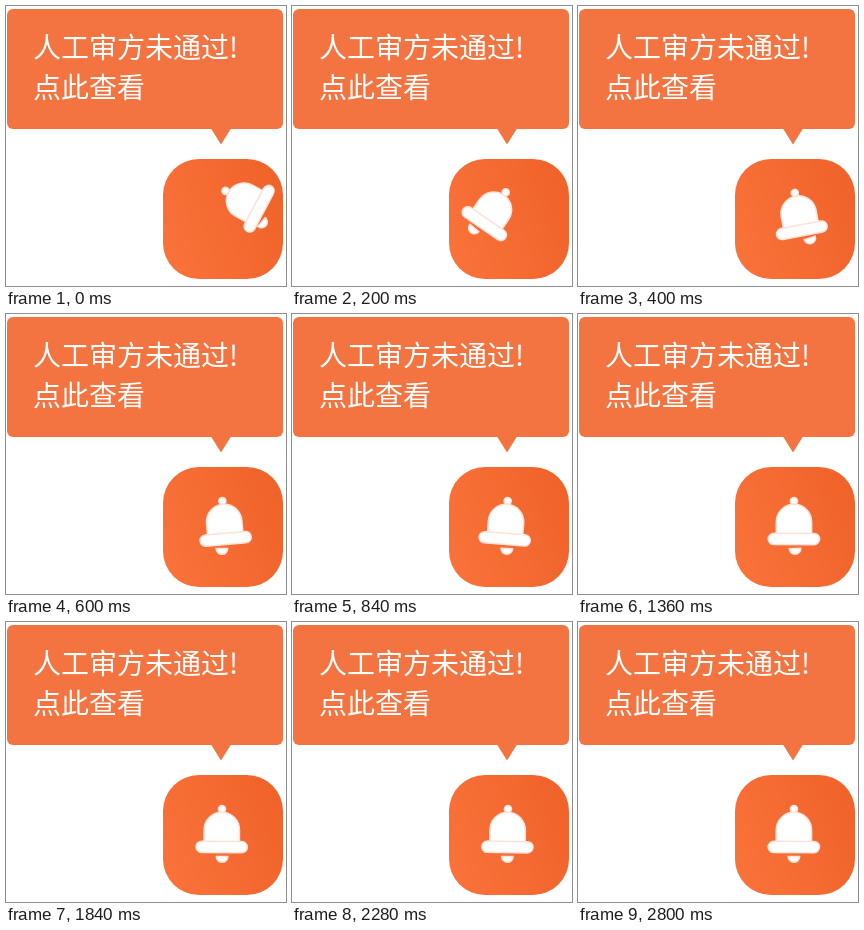
Write an HTML page with a canvas that moves like this. It is 280 px wide and 280 px high and loops after 2840 ms.

```html
<!DOCTYPE html>
<html lang="zh-CN">
<head>
<meta charset="utf-8">
<style>
  html, body { margin: 0; width: 100%; height: 100%; overflow: hidden; background: #fff; }
  canvas { display: block; width: 280px; height: 280px; }
</style>
</head>
<body>
<canvas id="stage" width="280" height="280"></canvas>
<script>
const ctx = document.getElementById('stage').getContext('2d');
const LOOP = 2840, STEP = 40;
const PIVOT = { x: 216, y: 183 };
const RAD = Math.PI / 180;
const OUTLINE = '#fde2d9';

const iconFill = ctx.createLinearGradient(157, 235, 277, 190);
iconFill.addColorStop(0, '#f97239');
iconFill.addColorStop(1, '#f0632b');

// Damped swing in degrees; t in ms.
const swing = (t, size, lead) =>
  -size * Math.exp(-0.0018 * t) * Math.cos((0.727 * t + lead) * RAD);

// Short extra push right after the start.
const kick = t => 14 * (t / 40) * Math.exp(1 - t / 40);

const bellAngle = t => swing(t, 62, 0) - kick(t);
const clapperAngle = t => swing(t, 64, 14) + 12 * Math.exp(-t / 60) - 1.2 * kick(t);

function roundRect(x, y, w, h, r, fill) {
  ctx.beginPath();
  ctx.roundRect(x, y, w, h, r);
  ctx.fillStyle = fill;
  ctx.fill();
}

function paintWhite() {
  ctx.fillStyle = '#fff';
  ctx.fill();
  ctx.strokeStyle = OUTLINE;
  ctx.lineWidth = 1.5;
  ctx.stroke();
}

function rotated(angle, draw) {
  ctx.save();
  ctx.translate(PIVOT.x, PIVOT.y);
  ctx.rotate(angle * RAD);
  draw();
  ctx.restore();
}

function drawClapper() {
  ctx.beginPath();
  ctx.arc(0, 51.5, 5.8, 0, Math.PI);
  ctx.closePath();
  paintWhite();
}

function drawBell() {
  ctx.beginPath();
  ctx.arc(0, 4, 3.6, 0, 2 * Math.PI);
  paintWhite();

  ctx.beginPath();
  ctx.moveTo(-17.7, 38);
  ctx.lineTo(-17.7, 25);
  ctx.arc(0, 25, 17.7, Math.PI, 0);
  ctx.lineTo(17.7, 38);
  ctx.closePath();
  paintWhite();

  ctx.beginPath();
  ctx.roundRect(-25.7, 36.4, 51.4, 11.2, 5.6);
  paintWhite();
}

function drawBubble() {
  const color = '#f37440';
  roundRect(1, 3, 276, 120, 6, color);
  ctx.beginPath();
  ctx.moveTo(205, 122.5);
  ctx.lineTo(225, 122.5);
  ctx.lineTo(215, 138.5);
  ctx.closePath();
  ctx.fill();

  ctx.fillStyle = '#fff';
  ctx.font = '300 28px "Noto Sans CJK SC", "Noto Sans CJK", sans-serif';
  ctx.fillText('人工审方未通过!', 27, 51.5);
  ctx.fillText('点此查看', 27, 91.5);
}

function render(now) {
  const t = Math.floor((now % LOOP) / STEP) * STEP;
  ctx.fillStyle = '#fff';
  ctx.fillRect(0, 0, 280, 280);
  drawBubble();
  roundRect(157, 153, 120, 120, 36, iconFill);
  rotated(clapperAngle(t), drawClapper);
  rotated(bellAngle(t), drawBell);
}

const start = performance.now();
function tick() {
  render(performance.now() - start);
  requestAnimationFrame(tick);
}
tick();
</script>
</body>
</html>
```
